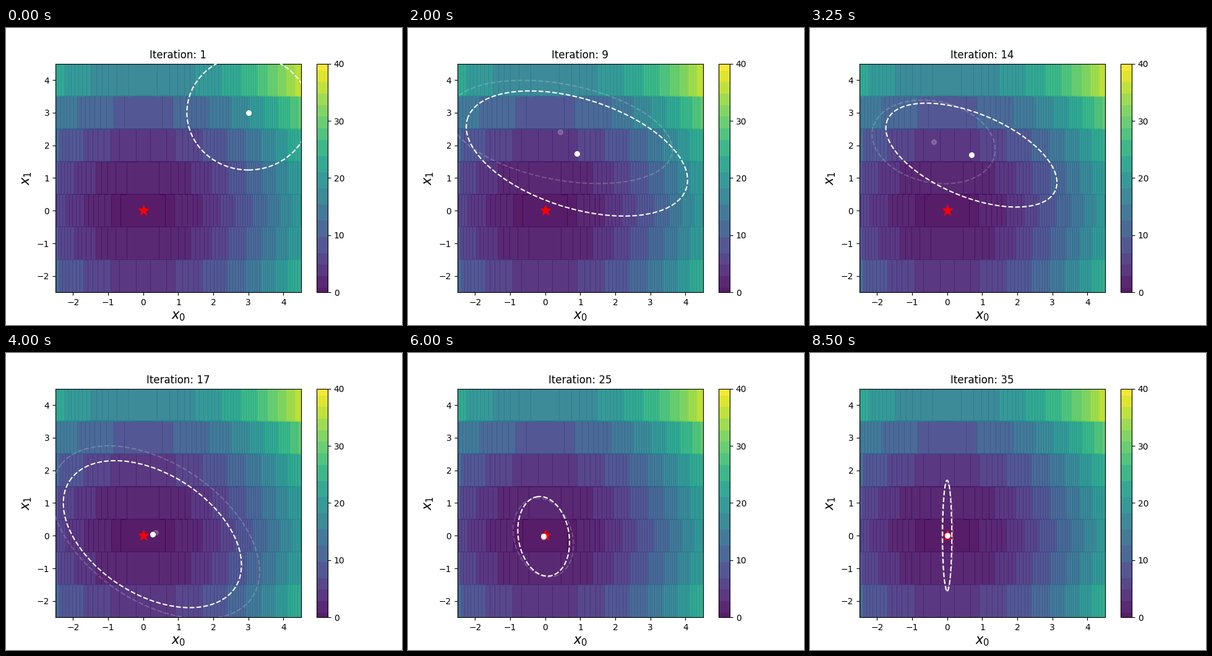
Recreate the animation shown at these times as a matplotlib script. Size 640 px wide and 480 px high, loop 8750 ms.

```python
import numpy as np
import matplotlib.pyplot as plt
from matplotlib.animation import FuncAnimation
from matplotlib.colors import ListedColormap
from matplotlib.patches import Ellipse

STEPS = 35
LO, HI = -2.5, 4.5
LEVELS = 99

# Turning points of the search: iteration -> mean, half extents, correlation
POSES = {
    1: (3, 3, 1.755, 1.755, 0),
    5: (1.335, 3.065, 2.51, 1.375, -0.31),
    8: (0.435, 2.41, 3.19, 1.58, -0.34),
    9: (0.905, 1.75, 3.155, 1.915, -0.425),
    13: (-0.385, 2.105, 1.755, 1.28, -0.18),
    14: (0.69, 1.7, 2.44, 1.59, -0.525),
    16: (0.35, 0.1, 2.97, 2.65, -0.45),
    21: (-0.085, -0.17, 1.36, 1.17, -0.3),
    29: (0, 0.13, 0.4, 1.27, 0),
    STEPS: (0, 0, 0.132, 1.695, 0),
}


def pose(it):
    """Means and correlation move linearly, extents geometrically."""
    x, y, w, h, r = np.array(list(POSES.values()), float).T

    def mix(v):
        return np.interp(it, list(POSES), v)

    return mix(x), mix(y), np.exp(mix(np.log(w))), np.exp(mix(np.log(h))), mix(r)


def banded_viridis():
    """Viridis merged into flat bands, wider in the middle of the range."""
    edges = np.r_[0, 2:17:5, 17:66:7, 66:LEVELS:5, LEVELS]
    mids = (edges[1:] + edges[:-1]) / 2 / LEVELS
    return ListedColormap(np.repeat(plt.get_cmap("viridis")(mids), np.diff(edges), axis=0))


class Distribution:
    """A mean dot with its dashed covariance ellipse."""

    def __init__(self, ax, alpha, zorder):
        style = dict(alpha=alpha, zorder=zorder)
        self.ring = ax.add_patch(Ellipse((0, 0), 1, 1, fill=False, ec="white",
                                         ls="--", lw=1.5, **style))
        self.dot, = ax.plot([], [], "o", color="white", markersize=5.5, **style)

    def place(self, it):
        x, y, w, h, r = pose(it)
        cov = np.array([[w * w, r * w * h], [r * w * h, h * h]])
        vals, vecs = np.linalg.eigh(cov)
        self.ring.set_center((x, y))
        self.ring.set_width(2 * np.sqrt(vals[0]))
        self.ring.set_height(2 * np.sqrt(vals[1]))
        self.ring.set_angle(np.degrees(np.arctan2(vecs[1, 0], vecs[0, 0])))
        self.dot.set_data([x], [y])

    def show(self, on):
        self.ring.set_visible(on)
        self.dot.set_visible(on)


fig, ax = plt.subplots(figsize=(6.4, 4.8), dpi=100)

# Sphere function with an integer second variable
grid = np.linspace(LO, HI, 700)
x0, x1 = np.meshgrid(grid, grid)
field = ax.contourf(x0, x1, x0 ** 2 + np.round(x1) ** 2,
                    levels=np.linspace(0, 40, LEVELS + 1),
                    cmap=banded_viridis(), vmin=0, vmax=40, alpha=0.9)
fig.colorbar(field, ax=ax, ticks=range(0, 41, 10))

ax.set(xlim=(LO, HI), ylim=(LO, HI))
ax.set_xlabel("$x_0$", fontsize=15)
ax.set_ylabel("$x_1$", fontsize=15)
title = ax.set_title("")
ax.plot(0, 0, "*", color="red", markersize=12.5, zorder=3)

ghost = Distribution(ax, 0.2, 4)
current = Distribution(ax, 1, 5)


def update(i):
    it = i + 1
    title.set_text(f"Iteration: {it}")
    current.place(it)
    ghost.place(it - 1)
    ghost.show(it > 1)
    return title, ghost.ring, ghost.dot, current.ring, current.dot


anim = FuncAnimation(fig, update, frames=STEPS, interval=250,
                     repeat=True, repeat_delay=0)
plt.show()
```
